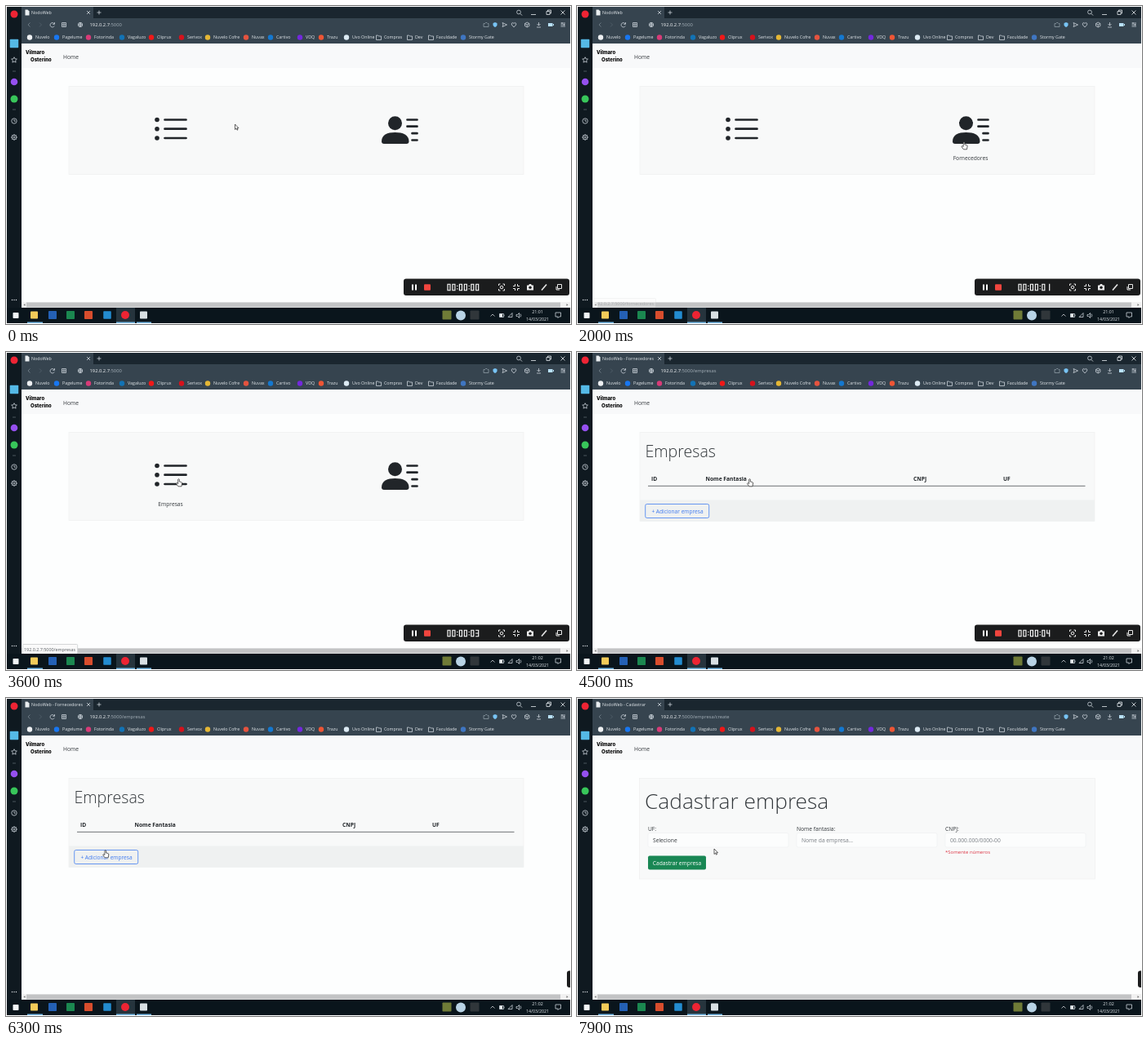
An HTML page for the animation above (8000 ms loop, 692 px wide and 390 px high).

```html
<!DOCTYPE html>
<html lang="pt-BR">
<head>
<meta charset="utf-8">
<title>Cadastro</title>
<style>
  html, body { margin: 0; width: 100%; height: 100%; overflow: hidden; background: #fff; }
  svg { display: block; width: 100vw; height: 100vh; }
  text { font: 6.7px "Open Sans", "Noto Sans", sans-serif; fill: #33383c; }
  .ui { font-size: 5.3px; fill: #e3e8ec; }
  .url { font-size: 5.8px; fill: #f4f6f8; }
  .dim { fill: #a5b0b9; }
  .bold { font-weight: 700; fill: #212529; }
  .brand { font: 800 6px Inter, "Liberation Sans", sans-serif; fill: #000; }
  .light { font-weight: 300; fill: #33383c; }
  .hint { fill: #777c82; }
  .mid { text-anchor: middle; }
  .line { fill: none; stroke: #c9d1d8; stroke-width: .8; }
  .card { fill: #f8f9f9; stroke: #eff0f0; stroke-width: .7; }
  .field { fill: #fcfdfd; stroke: #eff1f2; stroke-width: .7; }
  .ink { fill: #212529; }
  .bars { fill: none; stroke: #212529; stroke-width: 2.7; stroke-linecap: round; }
</style>
</head>
<body>
<svg viewBox="0 0 692 390" preserveAspectRatio="none">
  <defs><clipPath id="screen"><path d="M1 1H691V389H1Z"/></clipPath></defs>
  <g clip-path="url(#screen)">
    <path fill="#fdfefe" d="M19 46H691V370H19Z"/>
    <path fill="#f8f9fa" d="M19 46H691V76H19Z"/>
    <text class="brand" x="24" y="59">Vilmaro</text>
    <text class="brand" x="30" y="68">Osterino</text>
    <text x="70" y="64.5">Home</text>

    <g id="home">
      <rect class="card" x="77" y="98.5" width="557" height="108"/>
      <g class="ink">
        <circle cx="185" cy="139.5" r="2.8"/><circle cx="185" cy="150.7" r="2.8"/><circle cx="185" cy="162" r="2.8"/>
        <circle cx="476.5" cy="143.7" r="8.5"/>
        <path d="M460 166C460 158 467 155 476.5 155S493.500 158 493.500 166Q493.500 169 490.500 169H463Q460 169 460 166Z"/>
      </g>
      <path class="bars" d="M194.500 139.500H220.500M194.500 150.700H220.500M194.500 162H220.500M491.500 139.500H503.500M491.500 147.700H503.500M497.500 156.200H503.500M497.500 164.500H503.500"/>
      <text class="mid" id="listLabel" x="201.5" y="189">Empresas</text>
      <text class="mid" id="peopleLabel" x="482" y="189">Fornecedores</text>
    </g>

    <g id="list">
      <rect class="card" x="77" y="98.5" width="557" height="109"/>
      <path fill="#eff1f1" d="M77 181.500H634V207.500H77Z"/>
      <text class="light" x="83.5" y="128.500" style="font-size:19.6px">Empresas</text>
      <g id="heads"></g>
      <path stroke="#4b5054" stroke-width=".8" d="M87 164.300H622.500"/>
      <rect id="addBox" x="83.700" y="186.500" width="78" height="17" rx="2" stroke="#447ff0" stroke-width=".8" fill="#0d6efd"/>
      <text id="addText" class="mid" x="123" y="197.700" style="font-size:6.6px">+ Adicionar empresa</text>
    </g>

    <g id="form">
      <rect class="card" x="76.500" y="98.500" width="558" height="123.500"/>
      <text class="light" x="83" y="135.500" style="font-size:26.300px">Cadastrar empresa</text>
      <g id="fields"></g>
      <text x="451" y="191" style="font-size:6px;fill:#dc3545">*Somente números</text>
      <rect x="87" y="193.500" width="71" height="17" rx="2" fill="#198754"/>
      <text class="mid" x="122.500" y="204.500" style="fill:#fff">Cadastrar empresa</text>
    </g>

    <path fill="#f1f1f1" d="M19 363H691V370H19Z"/>
    <path fill="#c3c4c5" d="M25 363.500H679V369.500H25Z"/>
    <path fill="#777" d="M23.500 365L21.500 366.500L23.500 368ZM686.500 365L688.500 366.500L686.500 368Z"/>
    <g id="status">
      <rect id="statusBox" x="20.500" y="358.500" width="68" height="12" rx="1" fill="#fafafa" stroke="#c5c7c9" stroke-width=".7"/>
      <text id="statusText" x="22" y="366.500" style="font-size:5.4px;fill:#555a5f"></text>
    </g>

    <path fill="#1a262f" d="M1 1H691V15H1Z"/>
    <path fill="#36444f" d="M19 15H691V46H19ZM19 1H107V15H19Z"/>
    <path fill="#0f1920" d="M1 1H19V370H1Z"/>
    <path fill="#0a151c" d="M1 370H691V389H1Z"/>
    <path fill="#e9edf0" d="M23.500 4.500H26.500L28.500 6.500V11.500H23.500Z"/>
    <text class="ui" id="tab" x="31" y="10"></text>
    <text class="url" x="102.500" y="25.300">192.0.2.7<tspan class="dim">:5000<tspan id="path"></tspan></tspan></text>
    <g id="chrome"></g>
    <g id="marks"></g>

    <path fill="#26343d" d="M135 370H158V389H135Z"/>
    <path fill="#76b9e6" d="M26 387.500H45V389H26ZM135 387.500H158V389H135ZM160 387.500H178V389H160Z"/>
    <g id="logos"></g>
    <text class="ui mid" id="clock" x="651" y="377.300"></text>
    <text class="ui mid" x="651" y="386">14/03/2021</text>

    <g id="recorder">
      <rect x="487" y="334.500" width="203" height="20.500" rx="3" fill="#1b1c1d"/>
      <path stroke="#fff" stroke-width="2" d="M498 341.500V348.500M502 341.500V348.500"/>
      <rect x="512" y="341.300" width="8" height="7.500" rx="1" fill="#f0453e"/>
      <path id="digits" fill="none" stroke="#fff" stroke-width="1.150" stroke-linecap="square"/>
      <g fill="none" stroke="#e8e8e8">
        <path d="M603.500 343V341H605.500M608.500 341H610.500V343M610.500 347V349H608.500M605.500 349H603.500V347"/>
        <circle cx="607" cy="345" r="1.800"/>
        <path d="M621 343.500H623.500V341M626.500 341V343.500H629M629 346.500H626.500V349M623.500 349V346.500H621"/>
        <path stroke-width="1.600" d="M656 348.500L662 341.500"/>
        <path d="M675.500 341.500H680.500V346.500H675.500ZM674 344V348H678"/>
      </g>
      <path fill="#eee" d="M638 342.500H640L641 341H643L644 342.500H646V348.500H638Z"/>
      <circle cx="642" cy="345.300" r="1.700" fill="#1b1c1d"/>
    </g>

    <g id="cursor">
      <path id="arrow" fill="#fff" stroke="#222" stroke-width=".7" d="M0 0V6.500L1.500 5.100L2.500 7.200L3.500 6.700L2.600 4.700H4.500Z"/>
      <path id="hand" fill="#fff" stroke="#222" stroke-width=".7" stroke-linejoin="round" d="M-.8 6V.7Q0-.4.8.7V3.500L3.200 4Q4.200 4.300 4.100 5.500L3.500 9.300H-.6L-2.900 6.200Q-2.900 5-1.800 5.200Z"/>
    </g>
  </g>
</svg>
<script>
const LOOP = 8000, STEP = 100;
const $ = id => document.getElementById(id);
const fill = (id, parts) => { $(id).innerHTML = parts.join(''); };
const text = (x, y, words, cls = '') => `<text class="${cls}" x="${x}" y="${y}">${words}</text>`;
const line = (d, color = '#c9d1d8') => `<path class="line" style="stroke:${color}" d="${d}"/>`;
const dot = (x, y, r, color) => `<circle cx="${x}" cy="${y}" r="${r}" fill="${color}"/>`;
const square = (x, y, size, color) =>
  `<rect x="${x - size / 2}" y="${y - size / 2}" width="${size}" height="${size}" rx=".8" fill="${color}"/>`;

fill('heads', [[91, 'ID'], [157.5, 'Nome Fantasia'], [412, 'CNPJ'], [522, 'UF']]
  .map(([x, words]) => text(x, 158, words, 'bold')));

fill('fields', [
  [87, 'UF:', 'Selecione', ''],
  [269, 'Nome fantasia:', 'Nome da empresa...', 'hint'],
  [451, 'CNPJ:', '00.000.000/0000-00', 'hint'],
].map(([x, label, value, cls]) => text(x, 162.5, label) +
  `<rect class="field" x="${x}" y="165.5" width="172" height="17.5" rx="2"/>` + text(x + 6, 177, value, cls)));

// Bookmarks: text start, name, icon colour (none for folders)
fill('marks', [
  [36, 'Nuvelo', '#eef0f2'], [69, 'Pagelume', '#1877f2'], [108, 'Fotorinda', '#d83b78'],
  [149, 'Vagaluzo', '#1273b5'], [185, 'Cliprux', '#f01818'], [222, 'Serivox', '#d6121c'],
  [254, 'Nuvelo Cofre', '#e5b735'], [301, 'Nuvax', '#e5533f'], [331, 'Cartivo', '#1478d0'],
  [367, 'VDQ', '#7328dd'], [393, 'Trazu', '#ef5535'], [424, 'Uvo Online', '#dceaf3'],
  [463, 'Compras'], [501, 'Dev'], [527, 'Faculdade'], [567, 'Stormy Gate', '#3f76c2'],
].map(([x, name, color]) => text(x, 40.4, name, 'ui') +
  (color ? dot(x - 7, 38.5, 3.2, color) : line(`M${x - 9.5} 36h2l1 1h3v4.500h-6Z`))));

fill('chrome', [
  line('M99 6l4 4m0-4l-4 4M111.500 8h5M114 5.500v5'),
  line('M630 9.500l2 2M643 10.500h6M662 6.500h4v4h-4ZM663.500 6.500v-1.500h4v4h-1.500M679.500 5.500l5 5m0-5l-5 5', '#e5eaee'),
  '<circle class="line" cx="628" cy="7.500" r="2.400"/>',
  line('M29.500 20.500l-2.500 2.500l2.500 2.500', '#77858f'),
  line('M41 20.500l2.500 2.500l-2.500 2.500', '#52616c'),
  line('M59.200 22a2.700 2.700 0 1 0 0 2.500M59.500 20v2.300h-2.300'),
  line('M68.500 20.500h5v5h-5ZM71 20.500v5M68.500 23h5'),
  line('M88.300 23a2.700 2.700 0 1 0 5.400 0a2.700 2.700 0 1 0-5.400 0h5.400M91 20.300q-2 2.700 0 5.400q2-2.700 0-5.400'),
  line('M585 21.500h1.500l1-1h1.500l1 1h1v4h-6Z', '#8f9ca5'),
  '<path fill="#78c4f4" d="M596.500 21l2.500-1l2.500 1v2.500q-1 2-2.500 2.500q-1.500-.5-2.500-2.500Z"/>',
  line('M608 20.500l5.500 2.500l-5.500 2.500l1-2.500Z'),
  line('M622 26l-2.700-3q-.5-2.500 1.500-2.500l1.200 1l1.200-1q2 0 1.500 2.500Z'),
  line('M635.500 21.500l2.700-1.500l2.700 1.500v3l-2.700 1.500l-2.700-1.500ZM635.500 21.500l2.700 1.500l2.700-1.500M638.200 23v3'),
  line('M652.500 20v4m-2-2l2 2l2-2M650 26h5'),
  '<path fill="#b9e1f7" d="M664 21h5.500v4h-5.500ZM670 22h1v2h-1Z"/>',
  line('M679.500 21h5.500M679.500 23h5.500M679.500 25h5.500M681 20v2M683.500 22v2'),
  line('M10 62.700l1 2.100l2.400.3l-1.800 1.700l.5 2.400l-2.100-1.200l-2.100 1.200l.5-2.400l-1.800-1.700l2.400-.3Z'),
  line('M8 80h4M8 127h4', '#59656d'),
  '<circle class="line" cx="10" cy="141" r="3.200"/>', line('M10 139v2.200h1.700'),
  '<circle class="line" cx="10" cy="161" r="2.800"/><circle class="line" cx="10" cy="161" r="1"/>',
  line('M10 157v1.200M10 163.800v1.200M6 161h1.200M12.800 161h1.200M7.300 158.300l.8.8M11.900 162.900l.8.8M7.300 163.700l.8-.8M11.900 159.100l.8-.8'),
  ...[7.5, 10, 12.5].map(x => dot(x, 360.5, .7, '#e5eaee')),
  line('M593.500 380.500l2.500-2.500l2.500 2.500M604.500 377.500h5v4h-5ZM610 378.700v1.500M615 381.500l5-5v5ZM625 378.500h1.500l2-2v6l-2-2h-1.500ZM630 377.500q1.500 2 0 4M673 376h6.500v5h-2l-1.500 1.500v-1.500h-3Z'),
  '<path fill="#e5eaee" d="M604.500 377.500h3.500v4h-3.500Z"/>',
]);

fill('logos', [
  dot(10, 10, 4.5, '#ef2434'), square(10, 46, 10.5, '#55b9e6'),
  dot(10, 93, 4.3, '#9550ef'), dot(10, 114, 4.5, '#38c65a'),
  square(12, 379.5, 7, '#f2f5f7'), square(34.5, 379, 9, '#f3cb59'),
  square(57, 379, 10, '#2460b5'), square(79, 379, 10, '#1b8750'),
  square(101, 379, 10, '#d84d2d'), square(124, 379, 9.5, '#238cd0'),
  dot(146, 379, 5, '#ed2433'), square(168.5, 379, 9, '#d8dfe3'),
  square(540, 379, 11, '#6f7b37'), dot(557, 379.5, 6, '#b8d3e5'), square(574, 379, 11, '#30363a'),
]);

// Seven-segment strokes a..g, and the strokes lit for each digit
const SEGMENTS = { a: 'h3', b: 'v3.500', c: 'v3.500', d: 'h3', e: 'v3.500', f: 'v3.500', g: 'h3' };
const STARTS = { a: [0, 0], b: [3, 0], c: [3, 4], d: [0, 7.5], e: [0, 4], f: [0, 0], g: [0, 3.75] };
const LIT = ['abcdef', 'bc', 'abged', 'abgcd', 'fgbc', 'afgcd', 'afgedc', 'abc', 'abcdefg', 'abcdfg'];

function sevenSegment(seconds) {
  let x = 541, d = '';
  for (const c of '00:00:' + String(seconds).padStart(2, '0')) {
    if (c === ':') {
      d += `M${x} 343.200v.1M${x} 346.800v.1`;
      x += 2.6;
    } else {
      for (const s of LIT[c]) d += `M${x + STARTS[s][0]} ${341.2 + STARTS[s][1]}${SEGMENTS[s]}`;
      x += 5.9;
    }
  }
  return d;
}

const PATH = [
  [0, 280.5, 145], [100, 280.5, 145], [900, 212, 151], [1100, 212, 151],
  [2000, 474, 166.5], [2300, 474, 166.5], [3200, 211.5, 155.5], [4500, 211.5, 155.5],
  [5400, 81, 160], [5600, 81, 160], [6300, 121.7, 186.5], [6600, 122, 192],
  [7200, 122, 192], [7800, 168, 185], [LOOP, 168, 185],
];
const LINKS = [
  [800, 1250, '/empresas'], [1850, 2350, '/fornecedores'],
  [3100, 4200, '/empresas'], [6250, 7200, '/empresa/create'],
];
const PAGES = [
  [0, 'home', 'NodoWeb', ''],
  [4200, 'list', 'NodoWeb - Fornecedores', '/empresas'],
  [7200, 'form', 'NodoWeb - Cadastrar', '/empresa/create'],
];
const clamp = v => Math.min(1, Math.max(0, v));
const show = (id, on) => { $(id).style.display = on ? '' : 'none'; };

function cursorAt(t) {
  const i = PATH.findIndex(p => p[0] > t);
  const [t0, x0, y0] = PATH[i - 1], [t1, x1, y1] = PATH[i];
  const k = (t - t0) / (t1 - t0), e = k * k * (3 - 2 * k);
  return [x0 + (x1 - x0) * e, y0 + (y1 - y0) * e];
}

function draw(t) {
  const [, page, title, path] = PAGES.findLast(p => t >= p[0]);
  for (const p of PAGES) show(p[1], p[1] === page);
  $('tab').textContent = title;
  $('path').textContent = path;
  $('clock').textContent = t < 3600 ? '21:01' : '21:02';

  const link = LINKS.find(([from, to]) => t >= from && t < to);
  show('listLabel', link?.[2] === '/empresas');
  show('peopleLabel', link?.[2] === '/fornecedores');
  const hover = page === 'list' && link ? clamp((t - 6300) / 150) : 0;
  $('addBox').setAttribute('fill-opacity', hover);
  $('addText').style.fill = hover > .5 ? '#fff' : '#3d78ee';

  $('status').style.opacity = link ? clamp((t - link[0] - 100) / 200) : 0;
  if (link) {
    $('statusText').textContent = '192.0.2.7:5000' + link[2];
    $('statusBox').setAttribute('width', $('statusText').getComputedTextLength() + 4);
  }

  const left = 1 - clamp((t - 5300) / 500);
  $('recorder').setAttribute('transform', `translate(${200 * (1 - left * left)})`);
  $('digits').setAttribute('d', sevenSegment(Math.max(0, Math.floor((t - 200) / 1000))));

  const hand = Boolean(link) || (t >= 4200 && t < 4600);
  show('hand', hand);
  show('arrow', !hand);
  $('cursor').setAttribute('transform', `translate(${cursorAt(t)})`);
}

const start = performance.now();
function tick() {
  const t = (performance.now() - start) % LOOP;
  draw(Math.floor(t / STEP) * STEP);
  requestAnimationFrame(tick);
}
tick();
</script>
</body>
</html>
```
